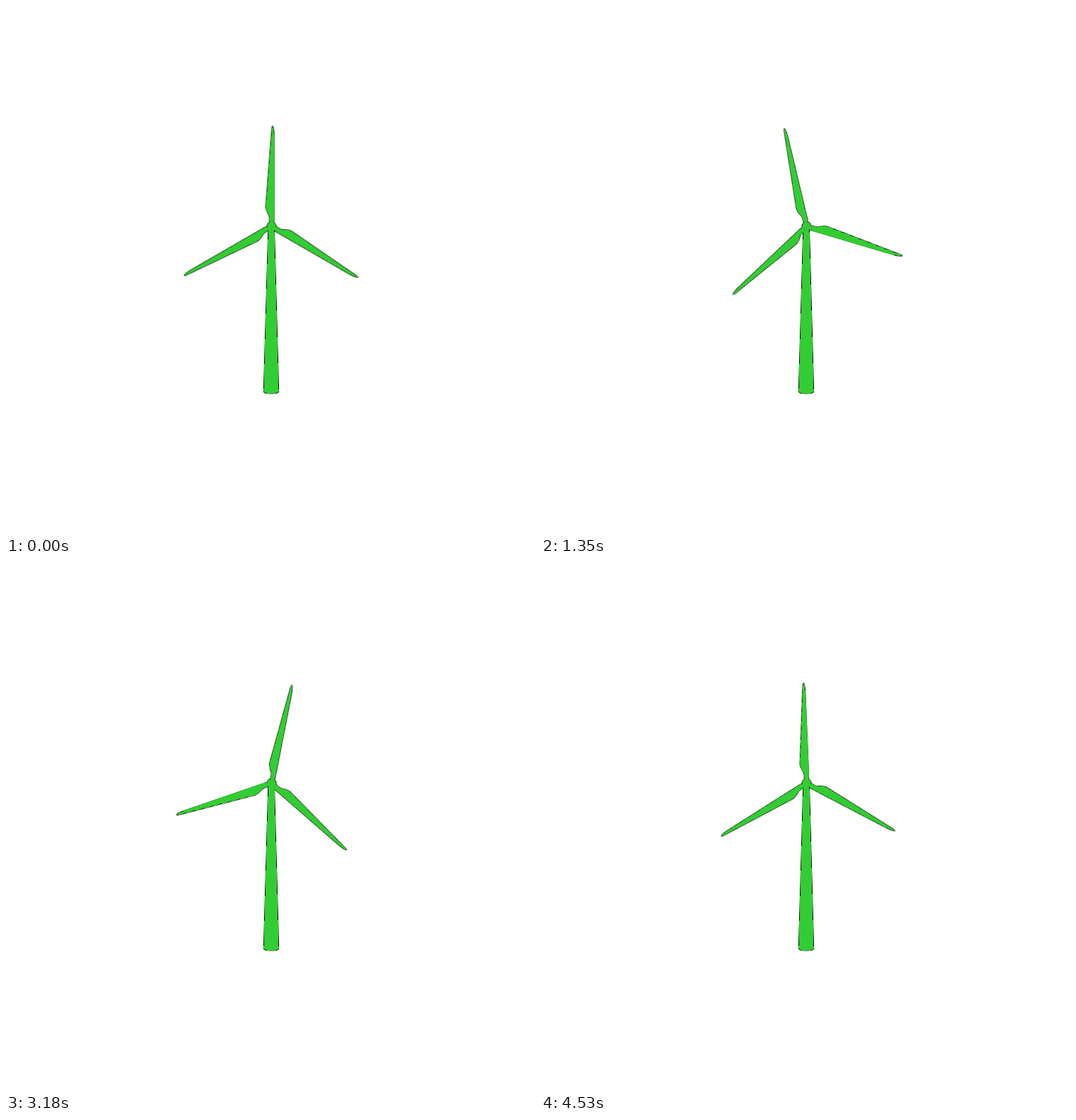
Write an HTML page that moves like this. It is 748 px wide and 748 px high and loops after 4.56 s.

```html
<!DOCTYPE html>
<html lang="en">
<head>
<meta charset="utf-8">
<title>Wind turbine</title>
<style>
  html, body { margin: 0; width: 100%; height: 100%; overflow: hidden; background: #fff; }
  svg { display: block; width: 100%; height: 100%; }
  .outline { fill: #000; stroke: #000; stroke-width: 1.1; stroke-linejoin: round; }
  .body { fill: #32cd32; shape-rendering: crispEdges; }
  .rotor { transform-origin: 0 0; }
</style>
</head>
<body>
<svg viewBox="0 0 748 748">
  <defs>
    <path id="tower" d="M371 312 H379.3 L385.6 545 C385.6 549 364.4 549 364.4 545 Z"/>
    <path id="blade" d="M1.4 -141.7 C2.3 -141.7 3.1 -137 3.5 -131 L3.5 -8 L0 0 L-3 -8
      C-2.7 -11 -2.7 -14 -3.8 -16 C-5.3 -19.5 -8.6 -23 -8.1 -28.5
      L.2 -136 C.5 -140 .9 -141.7 1.4 -141.7 Z"/>
    <g id="blades">
      <circle r="6.4"/>
      <use href="#blade"/>
      <use href="#blade" transform="rotate(120)"/>
      <use href="#blade" transform="rotate(240)"/>
    </g>
  </defs>

  <!-- Hard-edged fills over soft outlines give the broken, dashed contour. -->
  <g class="outline">
    <use href="#tower"/>
    <g transform="translate(375.5 311.5)"><g class="rotor"><use href="#blades"/></g></g>
  </g>
  <g class="body">
    <use href="#tower"/>
    <g transform="translate(375.5 311.5)"><g class="rotor"><use href="#blades"/></g></g>
  </g>
</svg>
<script>
  const STEP = 30, STEPS = 152;

  for (const rotor of document.querySelectorAll('.rotor')) {
    rotor.animate(
      { transform: ['rotate(0deg)', 'rotate(360deg)'] },
      { duration: STEP * STEPS, iterations: Infinity, easing: `steps(${STEPS}, end)` }
    );
  }
</script>
</body>
</html>
```
